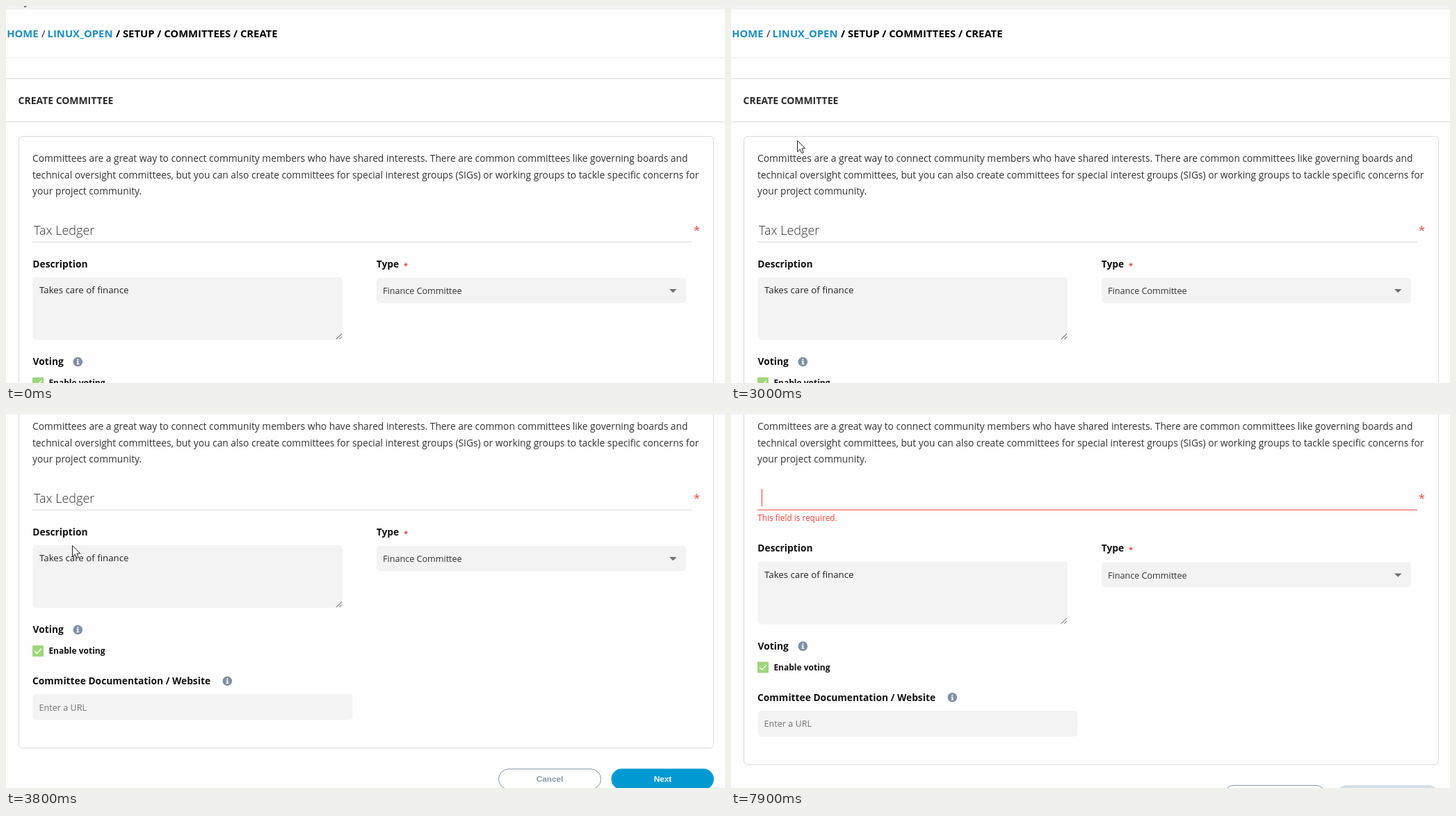
Write an HTML page with a canvas that moves like this. It is 1034 by 542 pixels and loops after 8 s.

```html
<!DOCTYPE html>
<html lang="en">
<head>
<meta charset="utf-8">
<title>Create committee</title>
<style>
html, body { margin: 0; width: 100%; height: 100%; overflow: hidden; background: #fefefe; }
canvas { display: block; }
</style>
</head>
<body>
<canvas id="stage" width="1034" height="542"></canvas>
<script>
const ctx = document.getElementById('stage').getContext('2d');
const W = 1034, H = 542, LOOP = 8000, TICK = 100;
const SANS = '"Open Sans", sans-serif';
const ARIAL = '"Liberation Sans", sans-serif';
const BLUE = '#1b8fc6', RED = '#f44336', FIELD = '#f3f3f3', BORDER = '#d8dce2', SELECT = '#3390ff';
const HEADING = 'CREATE COMMITTEE', NAME = 'Tax Ledger';
const FONT = {
  body: `13.79px ${SANS}`,
  bold: `bold 13.79px ${SANS}`,
  heading: `bold 13.95px ${SANS}`,
  crumb: `bold 14.8px ${SANS}`,
  name: `300 18px ${SANS}`,
  area: `13.25px ${SANS}`,
  field: `12.6px ${SANS}`,
  small: `11.82px ${SANS}`,
  smallBold: `bold 12px ${SANS}`,
  button: `bold 11.82px ${ARIAL}`
};
const INTRO = [
  'Committees are a great way to connect community members who have shared interests. There are common committees like governing boards and',
  'technical oversight committees, but you can also create committees for special interest groups (SIGs) or working groups to tackle specific concerns for',
  'your project community.'
];

// Keys are [time, value, value...]; values between them are linear.
function track(keys, t) {
  if (t <= keys[0][0]) return keys[0].slice(1);
  for (let i = 1; i < keys.length; i++) {
    const a = keys[i - 1], b = keys[i];
    if (t <= b[0]) {
      const k = (t - a[0]) / (b[0] - a[0]);
      return a.slice(1).map((v, j) => v + (b[j + 1] - v) * k);
    }
  }
  return keys[keys.length - 1].slice(1);
}

const SCROLL = [[3300, 0], [3400, 22], [3500, 22], [3600, 93], [3700, 150], [3800, 197]];
const HEADING_CHARS = [[1500, 0], [1600, 3], [1800, 13], [1900, 15], [2000, 16]];
const NAME_CHARS = [[5700, 0], [6300, 10]];
// The pointer is only visible away from editable or selectable text.
const POINTER = [
  { until: 1200, keys: [[300, 20, -17], [700, 50, 35], [1100, 15, 122]] },
  { from: 2100, until: 4100, keys: [[2500, 155, 131], [2800, 95, 193], [3800, 95, 193], [4100, 122, 134]] },
  { from: 5200, until: 5400, keys: [[5200, 99, 143]] },
  { from: 6400, until: 7200, keys: [[6400, 34, 124]] }
];

// Baselines snap to whole pixels so the text stays crisp while scrolled.
function text(str, x, y, font, color = '#333', align = 'left') {
  const offset = ctx.getTransform().f;
  ctx.font = font;
  ctx.fillStyle = color;
  ctx.textAlign = align;
  ctx.fillText(str, x, Math.round(y + offset) - offset);
}

function rect(x, y, w, h, color) {
  ctx.fillStyle = color;
  ctx.fillRect(x, y, w, h);
}

function box(x, y, w, h, r, fill, stroke) {
  ctx.beginPath();
  ctx.roundRect(x, y, w, h, r);
  if (fill) { ctx.fillStyle = fill; ctx.fill(); }
  if (stroke) { ctx.strokeStyle = stroke; ctx.lineWidth = 1; ctx.stroke(); }
}

function line(points, color, width = 1) {
  ctx.beginPath();
  points.forEach(([x, y]) => ctx.lineTo(x, y));
  ctx.strokeStyle = color;
  ctx.lineWidth = width;
  ctx.stroke();
}

function shape(points, color) {
  ctx.beginPath();
  points.forEach(([x, y]) => ctx.lineTo(x, y));
  ctx.closePath();
  ctx.fillStyle = color;
  ctx.fill();
}

function textWidth(str, font) {
  ctx.font = font;
  return ctx.measureText(str).width;
}

// Text with the characters from start to end highlighted.
function selectable(str, x, y, font, color, start, end, top, height) {
  text(str, x, y, font, color);
  if (end <= start) return;
  const left = Math.round(x + textWidth(str.slice(0, start), font));
  const right = Math.round(x + textWidth(str.slice(0, end), font));
  ctx.save();
  ctx.beginPath();
  ctx.rect(left, top, right - left, height);
  ctx.clip();
  rect(left, top, right - left, height, SELECT);
  text(str, x, y, font, '#fff');
  ctx.restore();
}

function infoIcon(x, y) {
  ctx.beginPath();
  ctx.arc(x, y, 6.8, 0, Math.PI * 2);
  ctx.fillStyle = '#7f8ea3';
  ctx.fill();
  rect(x - 1, y - 4, 2, 2, '#fff');
  rect(x - 1.8, y - 1, 2.8, 1.2, '#fff');
  rect(x - 0.8, y - 1, 1.8, 4.4, '#fff');
  rect(x - 1.8, y + 2.6, 3.8, 1.2, '#fff');
}

function drawHeader(t) {
  text('HOME', 1.2, 45, FONT.crumb, BLUE);
  text('/', 51, 45, `14.8px ${SANS}`, '#222');
  text('LINUX_OPEN', 59.6, 45, FONT.crumb, BLUE);
  text('/ SETUP / COMMITTEES / CREATE', 158, 45, FONT.crumb, '#000');
  rect(0, 74, W, 1, '#ececee');
  rect(0, 104, W, 1, BORDER);
  const chars = t < 3000 ? Math.round(track(HEADING_CHARS, t)[0]) : 0;
  selectable(HEADING, 17.6, 140.5, FONT.heading, '#2b2b2b', 0, chars, 120, 31);
  rect(0, 166, W, 1, BORDER);
}

function drawName(t, invalid) {
  if (!invalid) {
    const chars = Math.round(track(NAME_CHARS, t)[0]);
    selectable(NAME, 40, 328.5, FONT.name, '#333', NAME.length - chars, NAME.length, 309, 25);
  }
  rect(38, 338.7, 949, 1, invalid ? RED : '#d5d8df');
  text('*', 993.3, 328, `16px ${SANS}`, RED, 'center');
  if (invalid) text('This field is required.', 38.3, 355.4, FONT.small, RED);
  if (t >= 4800 && t < 5400) rect(129, 309, 1, 25, '#333');
  if (t >= 6900 && t < 7500) rect(40, 309, 1, 25, RED);
  if (t >= 7600) rect(44, 309, 1, 25, RED);
}

function drawFields() {
  text('Description', 38.3, 375.7, FONT.bold, '#111');
  text('Type', 532.8, 375.7, FONT.bold, '#111');
  text('*', 575, 376.6, `bold 11px ${SANS}`, RED, 'center');

  box(38.5, 389.7, 445.5, 90.2, 5, FIELD);
  text('Takes care of finance', 48, 413, FONT.area, '#222');
  line([[475, 479], [483, 471]], '#555');
  line([[479.5, 479], [483, 475.5]], '#555');

  box(533, 390.9, 444.8, 36, 5, FIELD);
  text('Finance Committee', 542, 414, FONT.field);
  shape([[954, 407], [964.5, 407], [959.2, 412.2]], '#707070');

  text('Voting', 38.5, 516.2, FONT.bold, '#111');
  infoIcon(103.3, 511.5);
  box(38, 534, 16, 16, 1, '#9fd67d');
  line([[41, 542], [44.5, 545.5], [51, 538.8]], '#fff', 1.3);
  text('Enable voting', 61.4, 546.2, FONT.smallBold, '#111');

  text('Committee Documentation / Website', 38, 590.2, FONT.bold, '#111');
  infoIcon(318.3, 585.2);
  box(38.5, 604.3, 460, 37, 5, FIELD);
  text('Enter a URL', 47.6, 627.7, FONT.field, '#757575');
}

function drawButtons(enabled) {
  box(708.5, 711.7, 147, 29, 14.5, '#fff', '#8492a8');
  text('Cancel', 782, 730, FONT.button, '#8b98aa', 'center');
  box(870.5, 711.3, 147.5, 29.8, 14.9, enabled ? '#0099d2' : '#d5dfe8');
  text('Next', 944.5, 730, FONT.button, '#fff', 'center');
}

function drawPointer(x, y) {
  const outline = [[0, 0], [0, 16], [3.8, 12.6], [6.3, 18], [8.8, 17], [6.4, 11.6], [11, 11.2]]
    .map(([dx, dy]) => [Math.round(x) + 0.5 + dx, Math.round(y) + 0.5 + dy]);
  shape(outline, '#fff');
  line([...outline, outline[0]], '#222');
}

function draw(time) {
  const t = Math.floor(time / TICK) * TICK;
  const invalid = t >= 6900;
  const shift = invalid ? 23.6 : 0;

  rect(0, 0, W, H, '#fefefe');
  ctx.save();
  ctx.translate(0, -track(SCROLL, t)[0]);
  drawHeader(t);
  box(18.5, 187.5, 999, 494 + shift, 5, null, BORDER);
  INTRO.forEach((str, i) => text(str, 38, 224 + i * 23.6, FONT.body));
  drawName(t, invalid);
  ctx.translate(0, shift);
  drawFields();
  drawButtons(!invalid);
  ctx.restore();

  rect(0, 0, W, 5, '#f2f2f2');
  const leg = POINTER.find(({ from = 0, until }) => t >= from && t < until);
  if (leg) drawPointer(...track(leg.keys, t));
}

const start = performance.now();
function frame() {
  draw((performance.now() - start) % LOOP);
  requestAnimationFrame(frame);
}
frame();
</script>
</body>
</html>
```
